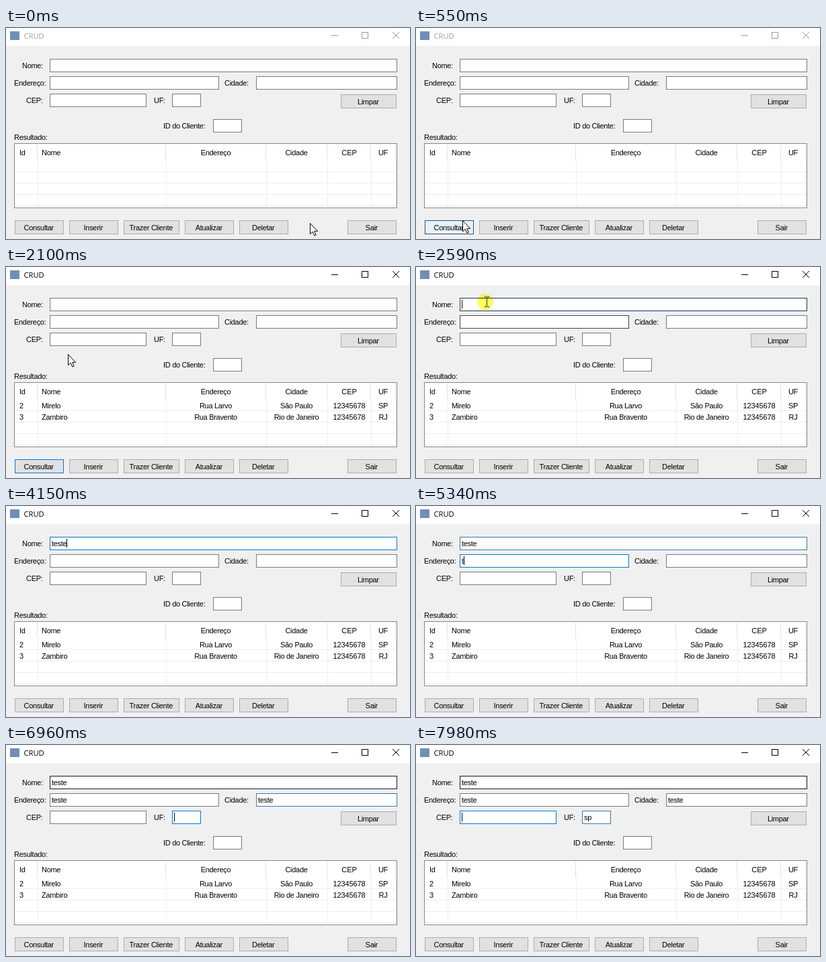
These frames come from a looping animation (601x315 px, 8000 ms). An HTML page:

```html
<!DOCTYPE html>
<html lang="pt">
<head>
<meta charset="utf-8">
<title>CRUD</title>
<style>
html, body { margin: 0; width: 100%; height: 100%; overflow: hidden; background: #f0f0f0; }
svg { display: block; width: 601px; height: 315px; }
text { font: 11px "Liberation Sans", Arial, sans-serif; letter-spacing: -.3px; fill: #000; white-space: pre; }
.mid { text-anchor: middle; }
.title { font: 11.2px "Open Sans", "Noto Sans", sans-serif; letter-spacing: 0; }
.num { letter-spacing: -.1px; }
.crisp, .field, .button { shape-rendering: crispEdges; }
.field { fill: #fff; stroke: #7a7a7a; }
.button { fill: #e1e1e1; stroke: #adadad; }
.grid { stroke: #ededed; }
.split { stroke: #e2e2e2; }
.controls { fill: none; stroke: #000; }
.idle .controls { stroke: #999; }
.idle .title { fill: #a0a09a; }
.glow { fill: #ffff5c; mix-blend-mode: multiply; }
</style>
</head>
<body>
<svg id="stage" viewBox="0 0 601 315">
  <rect width="601" height="315" fill="#f0f0f0"/>
  <g id="bar" class="idle">
    <rect width="601" height="27" fill="#fff"/>
    <rect x="6" y="5" width="14" height="13" fill="#6f8fb5"/>
    <text class="title" x="26.5" y="16">CRUD</text>
    <g class="controls">
      <path class="crisp" d="M484 11.5h10M529.5 6.5h9v9h-9z"/>
      <path d="M575 6l10 10M585 6l-10 10"/>
    </g>
  </g>
  <g id="form"></g>
  <g id="rows"></g>
  <rect id="caret" class="crisp" width="1" height="13"/>
  <circle id="glow" class="glow" r="12"/>
  <path id="arrow" fill="#fff" stroke="#000" stroke-linejoin="round"
    d="M.5 .5V16.6L4.2 13.2 6.8 19 9.2 18 6.7 12.3H11.6Z"/>
  <path id="beam" class="crisp" fill="none" stroke="#333" d="M-3 -7.5h2.5M.5 -7.5h3M-3 7.5h2.5M.5 7.5h3M.5 -7v14"/>
</svg>
<script>
const LOOP = 8000;
const $ = id => document.getElementById(id);

function add(parent, tag, attrs, content = "") {
  const el = document.createElementNS("http://www.w3.org/2000/svg", tag);
  for (const key in attrs) el.setAttribute(key, attrs[key]);
  el.textContent = content;
  return parent.appendChild(el);
}
const label = (parent, x, y, content, cls = "") =>
  add(parent, "text", { x, y, class: cls }, content);
const box = (cls, x, y, width, height) =>
  add($("form"), "rect", { class: cls, x: x + .5, y: y + .5, width: width - 1, height: height - 1 });

function makeField(x, y, w) {
  return { x, y, w, h: 20, rect: box("field", x, y, w, 20), text: label($("form"), x + 3, y + 14, "") };
}
function makeButton(x, y, w, name) {
  const rect = box("button", x, y, w, 21);
  label($("form"), x + w / 2 - .7, y + 15, name, "mid");
  return { x, y, w, h: 21, rect };
}

// Form
[["Nome:", 24, 60], ["Endereço:", 12, 86], ["Cidade:", 325, 86], ["CEP:", 30, 112],
 ["UF:", 220, 112], ["ID do Cliente:", 234, 150], ["Resultado:", 12, 167]]
  .forEach(([name, x, y]) => label($("form"), x, y, name));

const nome = makeField(65, 46, 517), endereco = makeField(65, 72, 252),
      cidade = makeField(372, 72, 210), cep = makeField(65, 98, 144), uf = makeField(247, 98, 43);
makeField(308, 136, 43);
const fields = [nome, endereco, cidade, cep, uf];

makeButton(498, 99, 83, "Limpar");
const query = makeButton(13, 287, 73, "Consultar");
makeButton(94, 287, 73, "Inserir");
makeButton(175, 287, 83, "Trazer Cliente");
makeButton(266, 287, 73, "Atualizar");
makeButton(347, 287, 73, "Deletar");
makeButton(508, 287, 73, "Sair");

// Result table
const table = box("crisp", 12, 172, 570, 97);
table.setAttribute("fill", "#fff");
table.setAttribute("stroke", "#828790");
const line = (cls, d) => add($("form"), "path", { class: "crisp " + cls, d });
for (const y of [214, 231, 248, 265]) line("grid", `M14 ${y}.5H580`);
for (const x of [47, 238, 387, 478, 543, 580]) {
  line("grid", `M${x}.5 198V267`);
  line("split", `M${x - 1}.5 174V198`);
}
function tableRow(parent, y, cells) {
  const cols = [20, 53, 312, 432, 510.5, 561];
  cells.forEach((cell, i) =>
    label(parent, cols[i], y, cell, (i > 1 ? "mid" : "") + (i == 4 ? " num" : "")));
}
tableRow($("form"), 190, ["Id", "Nome", "Endereço", "Cidade", "CEP", "UF"]);
tableRow($("rows"), 211, ["2", "Mirelo", "Rua Larvo", "São Paulo", "12345678", "SP"]);
tableRow($("rows"), 228, ["3", "Zambiro", "Rua Bravento", "Rio de Janeiro", "12345678", "RJ"]);

// Timeline: [time, x, y] of the pointer
const path = [
  [0, 452, 291], [70, 448, 288], [140, 420, 277], [210, 345, 267], [270, 262, 264],
  [340, 185, 267], [410, 130, 274], [480, 90, 282], [550, 69, 287], [620, 66, 293], [690, 64, 297],
  [1680, 65, 295], [1750, 67, 285], [1820, 71, 263], [1890, 76, 232], [1960, 82, 196],
  [2030, 87, 160], [2100, 92, 130], [2170, 96, 108], [2240, 99, 94], [2310, 102, 84],
  [2380, 104, 73], [2450, 105, 52]
];
const typing = [
  [nome, "teste", [3810, 3880, 3950, 4020, 4150]],
  [endereco, "teste", [5340, 5410, 5480, 5480, 5550]],
  [cidade, "teste", [6350, 6420, 6490, 6490, 6560]],
  [uf, "sp", [7030, 7100]]
];
const focus = [[2590, nome], [5270, endereco], [6280, cidade], [6890, uf], [7910, cep]];
const caretOn = [[2590, 3280], [3810, 4680], [5270, 5880], [6280, 7650], [7910, LOOP]];

const within = (t, from, to) => t >= from && t < to;
const latest = (list, t) => list.filter(item => item[0] <= t).pop();
const show = (el, on) => el.setAttribute("visibility", on ? "visible" : "hidden");
const place = (el, x, y) => el.setAttribute("transform", `translate(${x} ${y})`);
const inside = (r, [, x, y]) => within(x, r.x, r.x + r.w) && within(y, r.y, r.y + r.h);

function borderOf(field, t, pos) {
  const i = focus.findIndex(item => item[1] == field);
  const start = focus[i][0], end = i + 1 < focus.length ? focus[i + 1][0] : LOOP;
  if (field == nome && within(t, start, start + 70)) return "#123f66";
  if (within(t, start + 70, end + 70)) return "#0078d7";
  if (within(t, end + 70, end + 140)) return "#3c79aa";
  if (inside(field, pos)) return "#171717";
  return inside(field, latest(path, Math.max(0, t - 210))) ? "#444" : "#7a7a7a";
}

function render(t) {
  const pos = latest(path, t), [, x, y] = pos;
  const overField = fields.some(f => inside(f, pos));
  $("bar").setAttribute("class", t < 1020 ? "idle" : "");
  show($("rows"), t >= 1350);

  const hot = inside(query, pos), pressed = within(t, 1020, 1090);
  const focused = within(t, 1020, 2590);
  query.rect.style.fill = pressed ? "#cce4f7" : hot ? "#e5f1fb" : "";
  query.rect.style.stroke = hot ? "#2f4f6e" : focused ? "#0078d7" : "";

  for (const f of fields) f.rect.style.stroke = borderOf(f, t, pos);
  for (const [f, word, times] of typing)
    f.text.textContent = word.slice(0, times.filter(time => time <= t).length);

  const active = latest(focus, t);
  show($("caret"), active && caretOn.some(([from, to]) => within(t, from, to)));
  if (active) {
    const f = active[1];
    const width = f.text.textContent ? f.text.getComputedTextLength() : 0;
    place($("caret"), Math.round(f.x + 3 + width), f.y + 3);
  }

  show($("arrow"), !overField);
  show($("beam"), overField && t < 3810);
  show($("glow"), pressed || within(t, 2520, 2660));
  place($("arrow"), x, y);
  place($("beam"), x, y);
  place($("glow"), x - 2, y);
}

function tick() {
  render(performance.now() % LOOP);
  requestAnimationFrame(tick);
}
tick();
</script>
</body>
</html>
```
